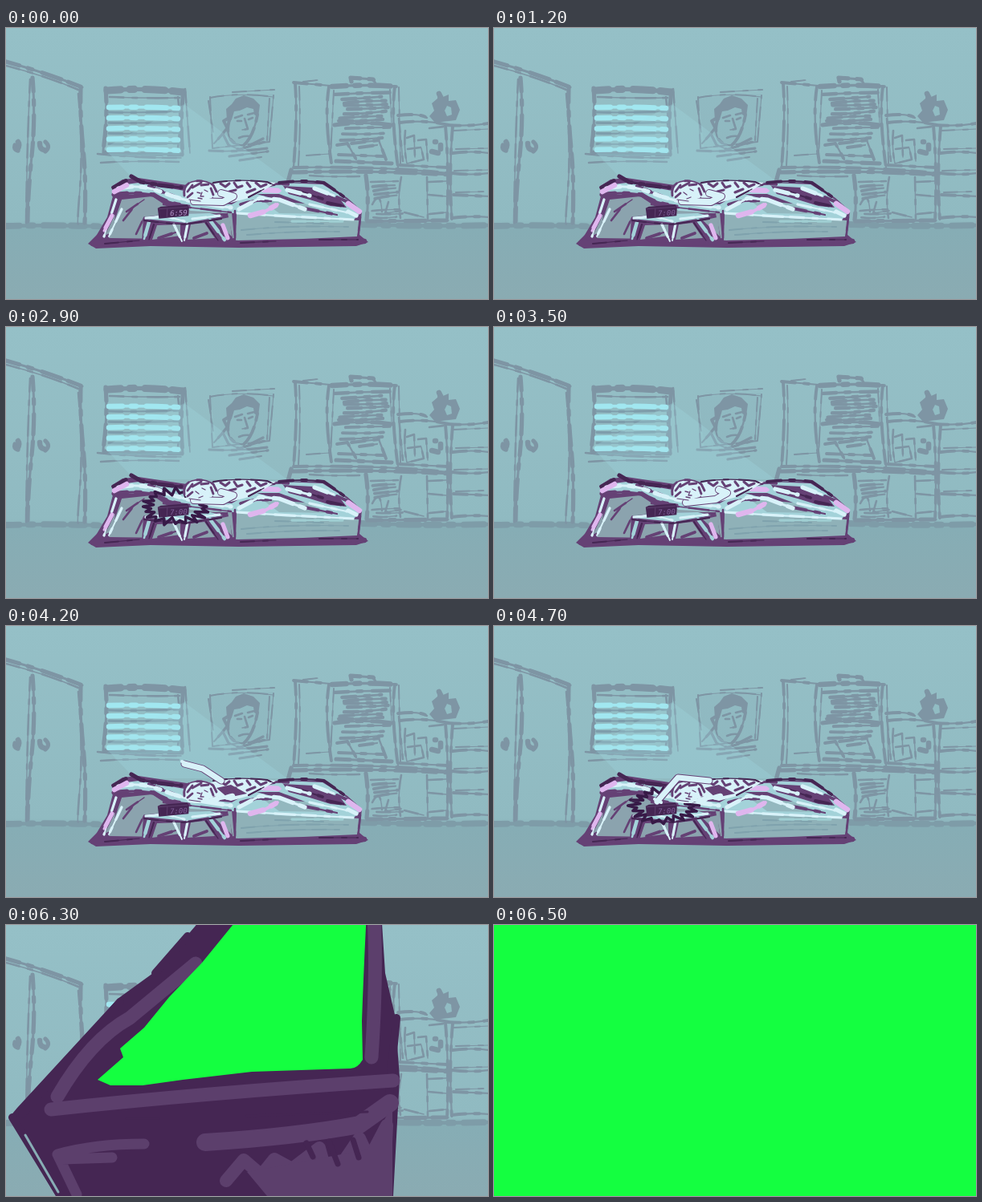
An HTML page with a canvas for the animation above (6.6 s loop, 600x338 px).

```html
<!DOCTYPE html>
<html lang="en">
<head>
<meta charset="utf-8">
<title>Alarm clock</title>
<style>
html, body { margin: 0; height: 100%; overflow: hidden; background: #93bec5 }
canvas { display: block; width: 100vw; height: 100vh }
</style>
</head>
<body>
<canvas id="stage" width="600" height="338"></canvas>
<script>
const g = document.getElementById('stage').getContext('2d');
const LOOP = 6600, STEP = 100;
const GREY = '#7e95a4', PLUM = '#654175', DARK = '#452653', HAZE = '#5c3f6c';
const WHITE = '#d8f2f9', PINK = '#dfb6ee', AQUA = '#a3d2d9', SLATE = '#8ba3ae', GREEN = '#14ff40';
g.lineCap = g.lineJoin = 'round';

let seed = 1;
const rnd = () => (seed = seed * 16807 % 2147483647) / 2147483647;

function ink(color, width, ...paths) {
  g.strokeStyle = color;
  g.lineWidth = width;
  for (const p of paths) g.stroke(new Path2D(p));
}
// Uneven stroke: a thin line with thicker dabs along it
function brush(color, width, ...paths) {
  ink(color, width * .75, ...paths);
  g.setLineDash([17, 11, 6, 13, 25, 9]);
  ink(color, width * 1.3, ...paths);
  g.setLineDash([]);
}
function fill(color, ...paths) {
  g.fillStyle = color;
  for (const p of paths) g.fill(new Path2D(p));
}
// Loose rows of marker strokes inside a box
function hatch(color, width, x, y, w, h, rows) {
  for (let i = 0; i <= rows; i++) {
    const a = x + rnd() * w * .25, b = x + w * (.75 + rnd() * .25), yy = y + h * i / rows;
    brush(color, width, `M${a} ${yy + rnd() * 3}Q${(a + b) / 2} ${yy + rnd() * 4 - 2} ${b} ${yy - rnd() * 2}`);
  }
}

function room() {
  const wall = g.createLinearGradient(0, 0, 0, 338);
  wall.addColorStop(0, '#95c0c7');
  wall.addColorStop(.71, '#90bac1');
  wall.addColorStop(.74, '#86adb5');
  wall.addColorStop(1, '#8aabb2');
  g.fillStyle = wall;
  g.fillRect(0, 0, 600, 338);
  brush('#7e9ca8', 6, 'M0 247Q60 245 130 248', 'M442 245Q520 248 600 246');
  wardrobe();
  blinds();
  poster();
  shelves();
  fill('rgba(165,222,228,.24)', 'M222 95L350 190H160L122 150Z');
}

function wardrobe() {
  brush(GREY, 4, 'M0 42Q50 56 95 74', 'M93 76Q92 110 96 150T98 243');
  brush(GREY, 2, 'M0 47Q50 60 90 77', 'M90 82Q96 150 92 200T90 244', 'M30 64Q26 150 25 244');
  brush(GREY, 4, 'M33 62Q37 110 32 160T27 242');
  brush(GREY, 5, 'M42 144Q42 151 47 152', 'M15 142Q18 146 14 152');
  brush(GREY, 4, 'M49 142Q56 148 49 154', 'M11 146Q9 152 15 153');
}

function blinds() {
  brush(GREY, 7, 'M126 78Q170 74 220 80');
  brush(GREY, 4, 'M124 75Q127 110 121 153', 'M221 78Q216 120 220 157', 'M122 155Q160 157 219 158');
  brush(GREY, 2, 'M129 86Q175 88 216 87', 'M214 86Q218 120 214 150', 'M114 157Q160 162 218 162',
    'M118 168Q160 165 215 167', 'M223 76L229 156');
  for (let i = 0; i < 5; i++) {
    const y = 99 + i * 13.2;
    brush('#7e9dab', 2.5, `M128 ${y + 6}Q170 ${y + 7} 215 ${y + 5}`);
    brush('#a1e7f0', 5, `M128 ${y}Q170 ${y - 1} 214 ${y + 1}`);
  }
}

function poster() {
  fill('rgba(122,146,162,.1)', 'M255 87L332 82L328 141L262 151Z');
  brush(GREY, 1.5, 'M254 87Q290 80 333 86', 'M254 86L257 150L328 142L333 84', 'M252 91L258 130',
    'M282 80L334 77', 'M328 88L325 140');
  fill(GREY, 'M275 114L274 101L281 95L286 88L296 84L308 88L316 96L314 111L309 108L308 101L300 99L291 103L284 104L281 114L277 121Z');
  brush(GREY, 3, 'M279 112Q274 126 278 137Q286 148 296 146Q308 136 313 108', 'M276 113L271 116L275 124');
  brush(GREY, 2, 'M285 112L294 109', 'M301 108L309 106', 'M288 116H293', 'M302 114L307 112',
    'M297 113L301 126L294 127', 'M290 137Q297 134 303 135');
  brush(GREY, 2.5, 'M275 125L268 134L259 144', 'M270 132L277 146L292 152L320 138', 'M253 153Q290 155 325 150',
    'M278 160L326 154', 'M291 165L318 161', 'M288 152L322 142');
}

function shelves() {
  brush(GREY, 3, 'M360 69Q363 110 358 174', 'M358 68L404 72', 'M402 73Q396 110 405 168', 'M484 73Q479 110 488 174',
    'M358 174Q460 172 552 181');
  brush(GREY, 5, 'M406 73Q450 70 486 73');
  brush(GREY, 1.5, 'M365 73Q367 120 364 172', 'M370 67L388 65', 'M408 78L404 160', 'M478 77L480 118',
    'M489 74L491 170', 'M374 159L402 157');
  brush(GREY, 4, 'M430 67L429 62L457 64L460 69', 'M409 121Q445 116 480 121', 'M411 166L480 169');
  seed = 7;
  hatch(GREY, 3.4, 409, 82, 70, 33, 7);
  hatch(GREY, 3, 410, 125, 70, 13, 2);
  brush(GREY, 3, 'M412 146L425 144L436 164', 'M430 144L464 140L473 164', 'M440 149L462 146', 'M414 158L470 160');
  // Desk
  brush(GREY, 4, 'M357 180Q450 177 553 183', 'M355 177L351 192', 'M448 184Q452 210 449 239', 'M450 241L550 240');
  brush(GREY, 2, 'M378 184Q398 186 440 185', 'M492 186Q487 210 491 237', 'M524 186L525 238', 'M454 192L488 191',
    'M456 220Q466 200 468 229', 'M476 217L472 231L492 228', 'M526 192L548 191', 'M526 208L548 210',
    'M527 232L548 230', 'M496 230L520 236');
  hatch(GREY, 3, 455, 197, 34, 13, 3);
  hatch(GREY, 2, 453, 227, 42, 9, 2);
  // Small items and the plant
  brush(GREY, 3, 'M488 109Q515 106 524 112', 'M490 118Q520 114 551 121', 'M490 171L550 174');
  brush(GREY, 2, 'M497 128Q495 150 499 169L520 164L517 150', 'M499 137L508 134L509 161', 'M513 140L523 139L525 166',
    'M500 151L516 149', 'M489 113L494 166', 'M527 125L545 123');
  brush(GREY, 5, 'M534 142H535', 'M530 154L538 156', 'M541 146V151', 'M539 82L542 88');
  fill(GREY, 'M530 94L537 88L538 80L544 86L551 83L551 91L560 90L565 102L560 115L534 118L527 110L533 103Z');
  fill('#91bcc3', 'M549 97L554 99L555 108L549 110L546 103Z');
  // Right-hand unit
  brush(GREY, 3, 'M547 122Q552 180 549 240', 'M556 123Q551 180 555 239', 'M548 121Q575 123 600 119',
    'M556 156Q580 153 600 156', 'M556 181Q580 184 600 181', 'M557 208L600 210', 'M555 237Q580 234 600 236');
  brush(GREY, 1.5, 'M556 128L600 126', 'M560 151L600 150', 'M558 178L600 177', 'M560 205L595 204');
}

function bed() {
  fill(PLUM, 'M102 269L113 258L126 236L134 206L131 198L145 189L165 187L225 196L340 193L397 193L425 212L443 228L440 258L451 267L436 272L290 274L180 272L112 275Z');
  fill(SLATE, 'M144 214L182 210L200 222L281 230L284 262L253 266L200 263L128 262Z', 'M123 259L136 232L134 253Z');
  fill('#8fb1b8', 'M287 231L340 234L440 240L437 260L370 263L286 265Z');
  fill(AQUA, 'M134 197L165 193L222 203L230 215L281 220L318 199L345 193L394 195L420 211L444 228L432 240L340 236L284 231L230 228L185 208L135 207Z');
  // Blanket
  fill('#93b8bf', 'M320 216L350 210L404 232L340 231Z');
  fill(PLUM, 'M345 197L382 199L416 214L424 224L404 222L378 214L352 207Z', 'M312 207L340 207L372 219L348 217Z');
  brush(PLUM, 3, 'M318 200Q330 193 352 195', 'M292 220Q310 214 330 216', 'M372 225L412 233', 'M412 211L430 219');
  brush(DARK, 3, 'M340 193Q370 189 396 193L420 210', 'M362 203L394 213', 'M400 218L420 222');
  brush(WHITE, 4, 'M290 226L316 212L340 214L372 226', 'M350 202L378 209', 'M384 200L408 209', 'M426 229L436 234');
  brush(WHITE, 2.5, 'M288 231Q350 235 432 239', 'M378 220L424 230');
  brush(PINK, 5, 'M304 234L322 229L338 220', 'M321 202L341 203', 'M426 219L440 229');
  // Pillow end
  brush(PLUM, 4, 'M134 208Q155 204 184 208', 'M142 211Q134 237 112 264', 'M184 208Q202 220 228 222', 'M178 198L214 212');
  brush(DARK, 4, 'M134 199L150 190', 'M156 185L168 192L186 195', 'M190 196L218 199');
  brush(WHITE, 4, 'M140 200Q165 194 192 204', 'M200 207Q224 217 280 224');
  brush(WHITE, 2.5, 'M137 214L122 260', 'M144 226L128 260');
  brush(PINK, 5, 'M135 204L150 196');
  brush(PINK, 4, 'M132 234L122 253');
  brush(PLUM, 2, 'M150 229L172 214', 'M146 240L160 222', 'M162 257L172 236', 'M285 228V265', 'M441 236L438 262',
    'M196 220L280 230');
  // Mattress front
  brush('#7fa2ad', 1.5, 'M293 252Q350 246 426 248', 'M300 258Q360 253 415 254', 'M335 242L395 244');
  brush('#9fced2', 2.5, 'M356 241L419 241');
  brush(PLUM, 5, 'M108 269Q190 266 286 268T446 266');
  brush(DARK, 1.5, 'M123 269L166 265', 'M292 268L336 266', 'M390 264L438 264');
}

function table() {
  fill(PLUM, 'M171 236L200 232L276 231L283 267L169 268Z');
  fill(SLATE, 'M188 246L217 245L217 259L182 264Z', 'M230 245L247 243L260 262L226 264Z', 'M260 240L278 236L281 260Z');
  brush(PLUM, 3, 'M190 262L214 254', 'M234 262L250 256');
  fill(AQUA, 'M173 238L195 232L254 231L270 235L224 243Z');
  brush(WHITE, 2.5, 'M174 237L200 235L222 241', 'M232 238L266 234');
  brush(AQUA, 3.5, 'M178 242L172 263', 'M254 240L272 264');
  brush(WHITE, 2.5, 'M209 245L219 266', 'M226 244L222 265');
  brush(DARK, 1.6, 'M172 240Q200 244 222 245L268 238', 'M184 245L178 264', 'M249 243L264 265');
  brush(PINK, 4, 'M270 246L276 262');
}

function buzz(t) {
  seed = t + 11;
  let d = '';
  for (let i = 0; i <= 40; i++) {
    const a = i / 40 * Math.PI * 2, r = (i % 2 ? .62 : .9) + rnd() * .2;
    d += `${i ? 'L' : 'M'}${211 + 42 * r * Math.cos(a)} ${224 + 22 * r * Math.sin(a)}`;
  }
  ink('#371a47', 3.5, d);
}

function sleeper(t) {
  const awake = t >= 3100, up = t >= 3800;
  // Back and patterned shirt
  fill(WHITE, 'M252 196Q276 189 304 190L336 193L322 202L302 212L280 218L258 212Z');
  brush(DARK, 1.6, 'M258 193Q290 188 325 192L334 196', 'M302 211L321 201');
  brush(PLUM, 2.4, 'M267 194L273 198L278 194', 'M284 193L288 199L294 197', 'M300 193L304 198', 'M311 193L317 198L324 195',
    'M278 204L286 202', 'M300 205L310 201');
  if (!up) {
    const d = awake ? 'M280 203L290 207L276 215L239 219' : 'M268 206L283 210L270 217L234 216';
    ink(PLUM, 10, d);
    ink(WHITE, 8, d);
  } else {
    fill(PLUM, 'M262 202L280 198L300 209L276 214Z');
    brush(WHITE, 5, 'M229 217Q250 220 282 212');
  }
  // Head
  g.save();
  g.translate(0, up && t < 5200 ? 3 : 0);
  fill(WHITE, 'M221 208C219 197 227 190 240 190C253 190 261 196 263 205L256 212L242 216L226 214Z');
  brush(PLUM, 2.2, 'M222 209Q220 196 231 192Q246 188 258 196L262 204', 'M226 204L232 196', 'M232 199L243 193',
    'M243 196L252 195', 'M226 211L232 206', 'M255 200L258 208');
  ink(PLUM, 1.2, 'M228 214L242 216');
  if (t < 1000 || awake) {
    ink(PLUM, 1.3, 'M238 205L242 206', 'M247 202L251 204', 'M244 205L242 210L246 210', 'M239 212L244 213');
  } else {
    ink(PLUM, 1.3, 'M236 205L240 208', 'M244 201L248 203', 'M240 213L245 211');
  }
  g.restore();
}

// time, elbow x y, hand x y
const ARM = [
  [3800, 262, 200, 238, 216], [4200, 245, 178, 222, 172], [4500, 240, 176, 215, 168],
  [4600, 229, 189, 203, 219], [5200, 229, 189, 203, 219], [5400, 252, 178, 242, 180],
  [5600, 281, 167, 294, 145], [5700, 283, 165, 303, 140], [6600, 283, 165, 303, 140]
];
function armAt(t) {
  const i = ARM.findIndex(k => k[0] > t), a = ARM[i - 1], b = ARM[i];
  const u = (t - a[0]) / (b[0] - a[0]);
  return a.map((v, j) => v + (b[j] - v) * u).slice(1);
}
function arm([ex, ey, hx, hy]) {
  const d = `M268 193L${ex} ${ey}L${hx} ${hy}`;
  ink(PLUM, 9, d);
  ink(WHITE, 7, d);
  ink(WHITE, 4, `M${hx - 3} ${hy - 3}L${hx + 5} ${hy + 1}`);
}

function clock(x, y, tilt, label) {
  g.save();
  g.translate(x, y);
  g.rotate(tilt);
  fill(DARK, 'M-20 -5L-16 -7L17 -8L19 -4L18 6L-19 8Z');
  ink(HAZE, 1, 'M-19 -4L17 -5', 'M-8 -4L-9 6');
  g.fillStyle = label === '6:59' ? '#b394c8' : '#80609a';
  g.font = 'italic 9px "DejaVu Sans Mono", monospace';
  g.fillText(label, -5, 5);
  g.restore();
}

// Clock rushing at the viewer, growing from the hand
function closeUp(scale) {
  g.save();
  g.translate(300, 130);
  g.scale(scale, scale);
  g.translate(-300, -130);
  fill(DARK, 'M14 228L139 92L190 55L252 -18L467 -18L472 60L484 112L490 190L482 338L476 430L120 430L62 338L4 240Z');
  ink(DARK, 10, 'M20 236L142 96', 'M186 60L226 14', 'M486 116L477 210', 'M8 240L68 338');
  ink('#88adb5', 3, 'M24 262L65 333');
  ink(HAZE, 17, 'M64 214Q105 143 154 116L236 48', 'M458 -8Q462 60 455 165', 'M56 230Q240 210 482 194');
  ink(HAZE, 13, 'M88 336L64 286Q110 273 172 273M70 292L132 290');
  ink(HAZE, 22, 'M248 271Q360 264 440 249L478 222');
  ink(HAZE, 16, 'M274 319L296 293L318 312L334 292L356 304L390 278L402 322L440 266L452 292L474 250L470 336');
  fill(HAZE, 'M300 308L450 280L481 225V338H325Z');
  ink(DARK, 7, 'M374 272L382 289', 'M402 270L413 298', 'M432 268L439 290');
  ink(DARK, 3, 'M300 238L450 233', 'M150 241H190');
  fill(GREEN, 'M283 -1L287 -18H449Q445 60 443 120L444 168Q437 180 427 179L306 183L220 193L170 200L130 200L114 193L146 165L142 154L172 128L203 90L244 47Z');
  g.restore();
}

const THROW = [.14, .27, .52, 1, 3.5];

function draw(t) {
  if (t >= 6500) {
    fill(GREEN, 'M0 0H600V338H0Z');
    return;
  }
  const ringing = t >= 1000 && t < 5200 && (t + 400) % 1000 < 500;
  room();
  bed();
  table();
  if (ringing) buzz(t);
  if (t < 5200) clock(209, 229, -.04, t < 1000 ? '6:59' : '7:00');
  sleeper(t);
  if (t >= 3800) {
    const a = armAt(t);
    arm(a);
    if (t >= 5200 && t < 6000) {
      const u = Math.min(1, (t - 5200) / 500);
      g.save();
      g.translate(a[2] + 6 * (1 - u), a[3] + 10 - 19 * u);
      g.scale(1 - .22 * u, 1);
      clock(0, 0, -.1 * u, '');
      g.restore();
    }
  }
  if (t >= 6000) closeUp(THROW[(t - 6000) / STEP]);
}

const start = performance.now();
function tick() {
  draw(Math.floor((performance.now() - start) % LOOP / STEP) * STEP);
  requestAnimationFrame(tick);
}
tick();
</script>
</body>
</html>
```
